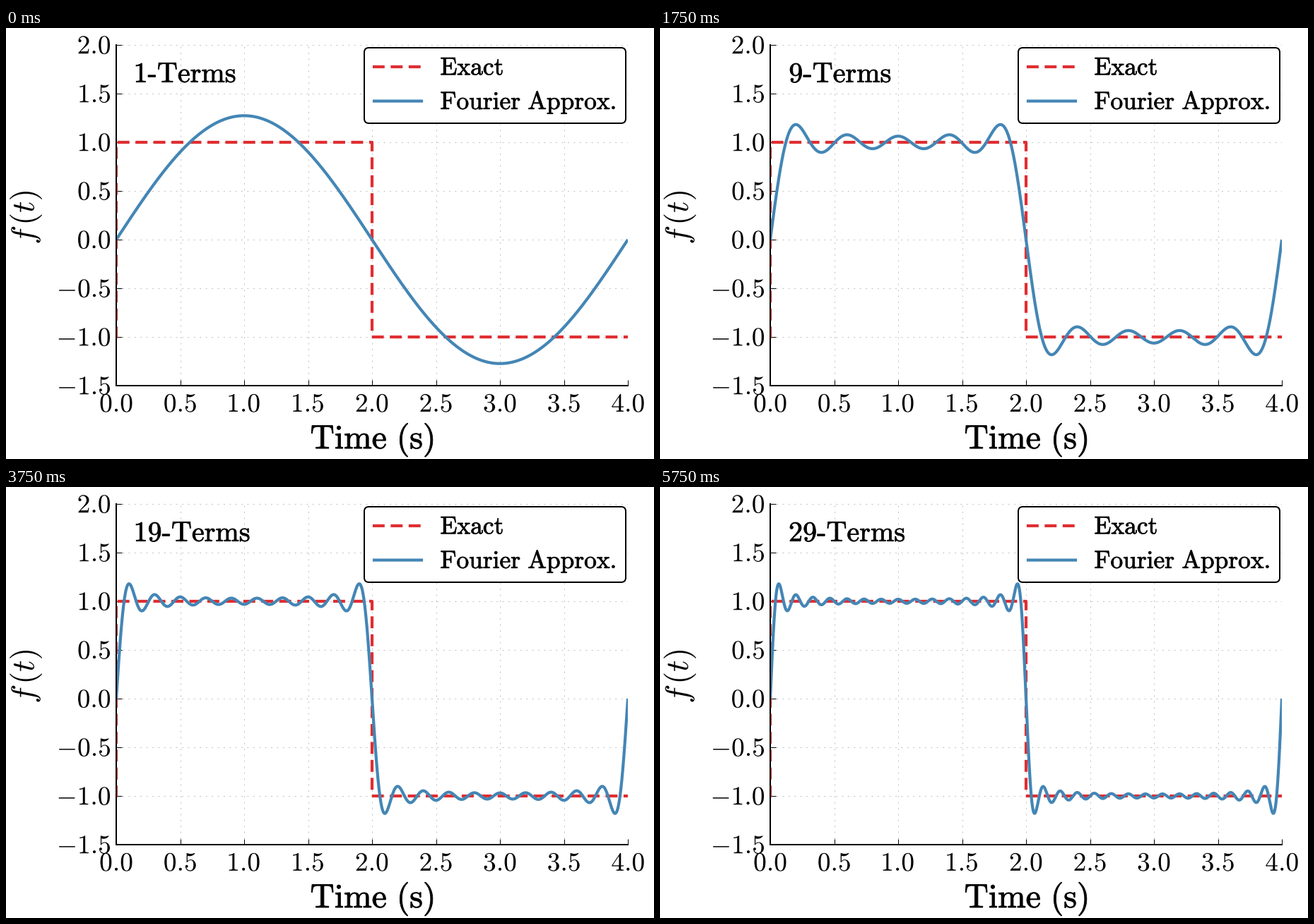
These frames come from a looping animation (917 px wide and 611 px high, 6.25 s). A matplotlib script:

```python
import numpy as np
import matplotlib.pyplot as plt
from matplotlib.animation import FuncAnimation
from matplotlib.patches import FancyBboxPatch, PathPatch
from matplotlib.lines import Line2D
from matplotlib.textpath import TextPath
from matplotlib.transforms import Affine2D, IdentityTransform

W, H = 917, 611
LEFT, RIGHT, TOP, BOTTOM = 156, 880, 24, 507
RED, BLUE = "#df2e31", "#4486b5"
LINE = 4.2
DASH = (0, (12.72 / LINE, 12.72 / LINE))
STEP_MS, TERM_MS = 250, 200
FRAMES = 25

plt.rcParams["mathtext.fontset"] = "cm"

# 72 dpi makes one point equal to one pixel
fig = plt.figure(figsize=(W / 72, H / 72), dpi=72, facecolor="white")
ax = fig.add_axes([LEFT / W, 1 - BOTTOM / H, (RIGHT - LEFT) / W, (BOTTOM - TOP) / H])


def roman(words):
    return "$" + r"\ ".join(r"\text{%s}" % w for w in words.split()) + "$"


def glyphs(x, y, s, size, align="left", angle=0):
    """Outline of s with its ink aligned at x and its baseline at y (y down)."""
    path = TextPath((0, 0), s, size=size)
    box = path.get_extents()
    shift = {"left": box.x0, "center": (box.x0 + box.x1) / 2, "right": box.x1}[align]
    move = Affine2D().translate(-shift, 0).rotate_deg(angle).translate(x, H - y)
    return path.transformed(move)


def write(x, y, s, size, bold=0.0, **kw):
    patch = PathPatch(glyphs(x, y, s, size, **kw), fc="black", ec="black",
                      lw=bold, zorder=6, transform=IdentityTransform())
    return fig.add_artist(patch)


def stroke(x0, x1, y, color, **kw):
    fig.add_artist(Line2D([x0, x1], [H - y, H - y], color=color, lw=LINE, snap=False,
                          transform=IdentityTransform(), zorder=6, **kw))


def partial_sum(t, n):
    k = np.arange(1, n + 1, 2)[:, None]
    return (4 / np.pi * np.sin(k * np.pi * t / 2) / k).sum(axis=0)


# Axes, grid and ticks
ax.set_xlim(0, 4)
ax.set_ylim(-1.5, 2)
ax.set_xticks(np.arange(0, 4.1, 0.5))
ax.set_yticks(np.arange(-1.5, 2.1, 0.5))
ax.set_axisbelow(True)
ax.grid(color="#c6c6c6", lw=1, ls=(0, (2.2, 6.2)))
ax.tick_params(direction="in", length=8, width=1, labelbottom=False, labelleft=False)
for side in ("top", "right"):
    ax.spines[side].set_visible(False)
for side in ("left", "bottom"):
    ax.spines[side].set_linewidth(2)

for v in ax.get_xticks():
    write(LEFT + v * (RIGHT - LEFT) / 4, 544, f"${v:.1f}$", 37.5, align="center")
for v in ax.get_yticks():
    y = TOP + (2 - v) * (BOTTOM - TOP) / 3.5
    write(147, y + 12.4, f"${v:.1f}$", 37.5, align="right")

write(518, 596, roman("Time (s)"), 47.6, bold=0.9, align="center")
write(39.5, 304.5, r"$f\hspace{0.12}(t)$", 45.8, angle=90)

# Curves
ax.plot([0, 0, 2, 2, 4], [-1, 1, 1, -1, -1], color=RED, lw=LINE, ls=DASH,
        dash_capstyle="projecting", dash_joinstyle="round", snap=False)
t = np.linspace(0, 4, 1001)
curve, = ax.plot(t, partial_sum(t, 1), color=BLUE, lw=LINE,
                 solid_capstyle="butt", solid_joinstyle="round")

# Legend
fig.add_artist(FancyBboxPatch((507, H - 135), 370, 107,
                              boxstyle="round,pad=0,rounding_size=6.5",
                              fc="white", ec="black", lw=2, zorder=5,
                              transform=IdentityTransform()))
stroke(521, 588, 55, RED, ls=DASH, dash_capstyle="projecting")
stroke(521, 588, 103.6, BLUE, solid_capstyle="projecting")
write(615.5, 66.5, roman("Exact"), 35.4, bold=0.8)
write(615.5, 115, roman("Fourier Approx."), 35.4, bold=0.8)

label = write(184, 77, roman("1-Terms"), 40.1, bold=0.8)


def update(i):
    n = 1 + min(i, FRAMES - 2) * STEP_MS // TERM_MS
    curve.set_ydata(partial_sum(t, n))
    label.set_path(glyphs(184, 77, roman(f"{n}-Terms"), 40.1))
    return curve, label


anim = FuncAnimation(fig, update, frames=FRAMES, interval=STEP_MS,
                     init_func=lambda: update(0), repeat=True, repeat_delay=0)
plt.show()
```
